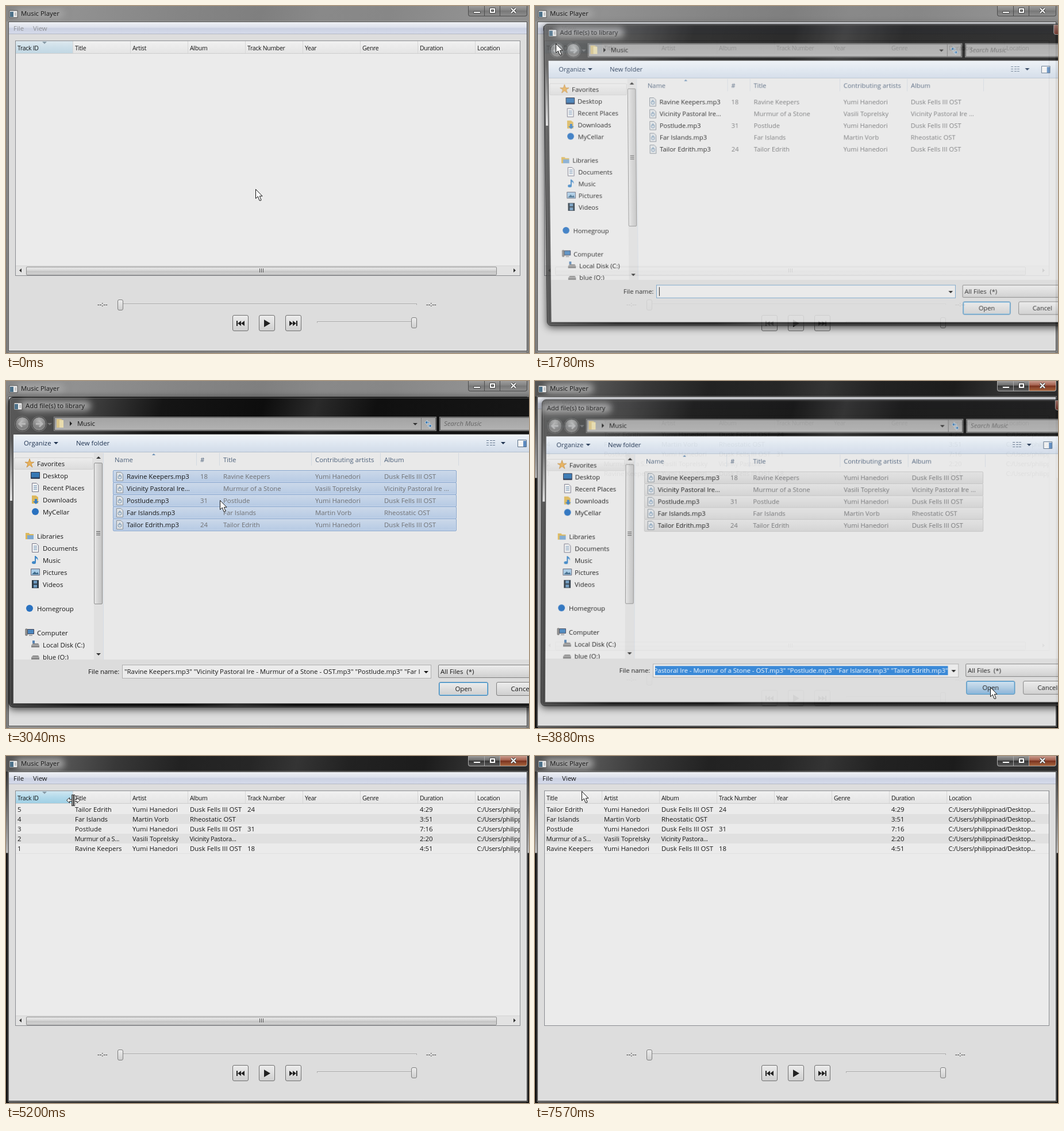
An HTML page that plays this animation: 910 by 603 pixels, repeating every 8000 ms.

```html
<!DOCTYPE html>
<html lang="en">
<head>
<meta charset="utf-8">
<title>Music Player</title>
<style>
html, body { margin: 0; width: 100%; height: 100%; overflow: hidden; }
#stage { position: relative; width: 910px; height: 603px; overflow: hidden; background: #777;
  font: 11.4px/16px "Open Sans", "Noto Sans", sans-serif; color: #161616; }
#stage div, #stage svg { position: absolute; box-sizing: border-box; }
#stage svg { overflow: visible; }
.t { white-space: pre; height: 16px; }
.s { font-size: 10.5px; letter-spacing: -.3px; }
.e { font-size: 11px; letter-spacing: -.3px; }
.dim { color: #6f7072; }
.glow { background: #a2a2a2; border-radius: 9px; filter: blur(6px); }
.glass { background: linear-gradient(100deg, #868686, #919191 120px, #858585 300px, #7f7f7f 440px, #898989 540px, #878787 660px, #919191 800px, #8c8c8c); }
.on .glass { background: linear-gradient(100deg, #555, #5c5c5c 80px, #383838 190px, #222 300px, #262626 420px, #343434 500px, #222 590px, #1c1c1c 720px, #333 810px, #222); }
.side { background: linear-gradient(#8f8f8f, #777); }
.on .side { background: linear-gradient(#2c2c2c, #b5b5b5 141px, #161616 142px, #101010); }
.btn { border: 1px solid #7e7e7e; border-radius: 3px; background: linear-gradient(#ececec, #dedede 50%, #cfcfcf); }
.cap { border: 1px solid #4c4c4c; border-top: 0; background: linear-gradient(#a0a0a0, #828282 50%, #777 50%, #8c8c8c); }
.on .cap { border-color: #aaa; background: linear-gradient(#a2a2a2, #666 50%, #333 50%, #5a5a5a); }
.on .cap.x { background: linear-gradient(#cfa598, #a05a47 50%, #78301e 50%, #a8663f); }
.menu { background: #efefef; border: 1px solid #979797; box-shadow: 2px 2px 3px #0006; }
.hot { border: 1px solid #aecff0; border-radius: 3px; background: linear-gradient(#e8eff8, #d5e4f4); }
.row { border: 1px solid transparent; border-radius: 2px; }
.row.sel { border-color: #84a4cd; background: linear-gradient(#cbd8e9, #b6cae4); box-shadow: inset 0 0 0 1px #d5e0ee99; }
.row.off { border-color: #c4c4c4; background: linear-gradient(#e2e2e2, #d3d3d3); }
</style>
</head>
<body>
<div id="stage"></div>
<script>
const stage = document.getElementById('stage');

function box(p, x, y, w, h, css = '', cls = '') {
  const d = document.createElement('div');
  d.className = cls;
  d.style.cssText = `left:${x}px;top:${y}px;width:${w}px;height:${h}px;${css}`;
  p.append(d);
  return d;
}
function txt(p, x, y, s, cls = '', css = '') {
  const d = document.createElement('div');
  d.className = 't ' + cls;
  d.style.cssText = `left:${x}px;top:${y - 8}px;${css}`;
  d.textContent = s;
  p.append(d);
  return d;
}
function art(p, x, y, inner) {
  const d = box(p, x, y, 0, 0);
  d.innerHTML = `<svg width="16" height="16">${inner}</svg>`;
  return d;
}
const tri = (p, x, y, w, h, c = '#333') =>
  art(p, x, y, `<path d="M${-w} 0H${w}L0 ${h}Z" fill="${c}"/>`);
const show = (d, on) => { d.style.display = on ? '' : 'none'; };
const appIcon = '<path d="M0 0H14V12H0Z" fill="#eee" stroke="#555"/><path d="M1 2H7V11H1Z" fill="#4d7189"/><path d="M9 4H12M9 6H12M9 8H12" stroke="#999"/>';

// Main window
const main = box(stage, 0, 0, 910, 603);
box(main, 0, 0, 910, 603, '', 'glass');
box(main, 0, 27, 5, 576, '', 'side');
box(main, 905, 27, 5, 576, '', 'side');
box(main, 16, 4, 86, 18, '', 'glow');
art(main, 5.5, 7.5, appIcon);
txt(main, 26, 13, 'Music Player');
box(main, 804, -1, 29, 19, 'border-radius:0 0 0 4px', 'cap');
box(main, 832, -1, 28, 19, '', 'cap');
box(main, 859, -1, 48, 19, 'border-radius:0 0 4px', 'cap x');
art(main, 0, 0, `<g fill="#fff" stroke="#444"><path d="M813.5 9.5H825.5V12.5H813.5Z"/>
<path d="M841.5 3.5H851.5V12.5H841.5ZM844.5 6.5V9.5H848.5V6.5Z" fill-rule="evenodd"/></g>
<path d="M879 4L887 12M887 4L879 12" stroke="#444" stroke-width="4"/><path d="M879 4L887 12M887 4L879 12" stroke="#fff" stroke-width="2"/>`);
box(main, 4, 27, 903, 573, 'background:#ddd;border:1px solid #4a4a4a;box-shadow:0 0 0 1px #aaa8');
box(main, 5, 28, 901, 21, 'background:linear-gradient(#eef0f4,#dde1ec 45%,#cbd1e2 55%,#d5daea);border-bottom:1px solid #b4b8c4');
const fileHot = box(main, 6, 29, 33, 19, 'border:1px solid #98a0b0;border-radius:3px;background:#ccd3e4');
const viewHot = box(main, 40, 29, 39, 19, 'border:1px solid #98a0b0;border-radius:3px;background:#d3d9e8');
const heads = [txt(main, 13, 39, 'File'), txt(main, 47, 39, 'View')];

// Track table
const table = box(main, 16, 60, 879, 409, 'background:#ebebeb;border:1px solid #8a8c90;overflow:hidden');
box(table, 0, 0, 877, 22, 'background:linear-gradient(#f1f1f1,#ebebeb 50%,#e4e4e4);border-bottom:1px solid #cfcfcf');
const rowBg = box(table, 0, 23, 877, 86, 'background:repeating-linear-gradient(#ebebeb 0 17px,#e0e0e0 17px 34px)');
const path = 'C:/Users/philippinad/Desktop/Music';
const dusk = 'Dusk Fells III OST', yumi = 'Yumi Hanedori';
const data = [
  ['Track ID', '5', '4', '3', '2', '1'],
  ['Title', 'Tailor Edrith', 'Far Islands', 'Postlude', 'Murmur of a S...', 'Ravine Keepers'],
  ['Artist', yumi, 'Martin Vorb', yumi, 'Vasili Toprelsky', yumi],
  ['Album', dusk, 'Rheostatic OST', dusk, 'Vicinity Pastora...', dusk],
  ['Track Number', '24', '', '31', '', '18'],
  ['Year'], ['Genre'],
  ['Duration', '4:29', '3:51', '7:16', '2:20', '4:51'],
  ['Location', path, path, path, path, path]
];
const cells = [], places = [];
const cols = data.map((list, i) => {
  const c = box(table, 0, 0, 100, 120, 'overflow:hidden');
  const bg = box(c, 0, 0, 100, 21, 'width:100%;border-right:1px solid #d6d6d6');
  list.forEach((s, r) => {
    const small = !r || i === 8 || s.endsWith('...');
    const d = txt(c, small && r ? 2.5 : 3, r ? 15 + 17 * r : 12, s, r ? (small ? 'e' : '') : 's');
    if (r) cells.push(d);
    if (r && i === 8) places.push(d);
  });
  return { c, bg };
});
const sort = tri(table, 50, 1, 4, 4, '#8699a5');

const bar = box(table, 0, 390, 877, 17, 'background:#e2e2e2;border-top:1px solid #d4d4d4');
const thumb = box(bar, 18, 1, 819, 15, 'border:1px solid #8d8d8d;border-radius:2px;background:linear-gradient(#e6e6e6,#d6d6d6 50%,#c6c6c6 50%,#cfcfcf)');
const grip = art(bar, 428, 4, '<path d="M.5 0V7M3.5 0V7M6.5 0V7" stroke="#555"/>');
art(bar, 0, 0, '<path d="M10 4V11L6 7.5ZM866 4V11L870 7.5Z" fill="#333"/>');

// Player controls
txt(main, 159, 518, '--:--');
txt(main, 731, 518, '--:--');
const groove = 'background:#e8e8e8;border:1px solid #a8a8a8;border-bottom-color:#ddd';
box(main, 194, 517, 521, 3, groove);
box(main, 541, 548, 174, 3, groove);
box(main, 194, 510, 10, 19, '', 'btn');
box(main, 705, 541, 10, 19, '', 'btn');
['M7 9V18H9V9ZM15 9V18L9 13.5ZM21 9V18L15 13.5Z', 'M9 7V20L20 13.5Z', 'M7 9V18L13 13.5ZM13 9V18L19 13.5ZM19 9V18H21V9Z']
  .forEach((d, i) => {
    const b = box(main, 394 + 46 * i, 537, 28, 28, 'border-color:#6f6f6f', 'btn');
    art(b, -1, 0, `<path d="${d}" fill="#222"/>`);
  });

function menu(x, w, h, items, step) {
  const m = box(main, x, 49, w, h, '', 'menu');
  box(m, 27, 1, 1, h - 4, 'background:#d8d8d8');
  const hot = box(m, 2, 1, w - 6, step, '', 'hot');
  items.forEach((s, i) => {
    txt(m, 32, 1 + step * (i + .5), s);
    if (items.length > 1) art(m, 8, 4 + step * i, '<path d="M3 7L6 10L11 3" fill="none" stroke="#222" stroke-width="2"/>');
  });
  return { m, hot };
}
const fileMenu = menu(5, 165, 26, ['Add file(s) to library'], 22);
const viewMenu = menu(40, 140, 184, data.map(d => d[0]), 20);

// File dialog, laid out in stage coordinates
const dlg = box(stage, 5, 28, 964, 539, 'border-radius:7px;background:linear-gradient(105deg,#5a5a5a,#3c3c3c 150px,#151515 260px,#0d0d0d 430px,#2a2a2a 520px,#101010 620px,#1a1a1a);border:1px solid #050505;box-shadow:inset 0 0 0 1px #8888,0 3px 14px #000c');
const D = box(dlg, -6, -29, 964, 600);
box(D, 7, 100, 4, 108, 'background:linear-gradient(#fff0,#e2e2e2)');
const dlgGlow = box(D, 24, 34, 124, 18, '', 'glow');
const dlgIcon = art(D, 13.5, 37.5, appIcon);
const dlgTitle = txt(D, 34, 43, 'Add file(s) to library');
box(D, 911, 29, 46, 18, 'border:1px solid #999;border-radius:0 0 4px 4px;background:linear-gradient(#96685f,#6b2c20)');
for (const x of [16, 45]) {
  const b = box(D, x, 62, 25, 25, 'border-radius:50%;border:1px solid #444;background:radial-gradient(circle at 50% 25%,#b4b4b4,#808080 60%,#989898);box-shadow:0 0 0 1px #777');
  art(b, 0, 0, `<path d="M6 11.5H17M${x < 20 ? '11 6.5L6 11.5L11 16.5' : '12 6.5L17 11.5L12 16.5'}" fill="none" stroke="#b8b8b8" stroke-width="3"/>`);
}
tri(D, 76, 73, 4, 4, '#777');
const field = 'border:1px solid #555;background:linear-gradient(#a3a3a3,#b2b2b2);box-shadow:0 0 0 1px #888';
box(D, 84, 63, 664, 23, field);
box(D, 722, 64, 1, 21, 'background:#777');
art(D, 88, 66, '<path d="M0 0H8L12 4V15H0Z" fill="#d9c48a"/><path d="M5 2H12V15H5Z" fill="#e9dcae"/>');
art(D, 111, 70, '<path d="M0 0V8L4 4Z" fill="#222"/>');
txt(D, 124, 74, 'Music');
tri(D, 712, 73, 4, 4);
art(D, 728, 67, '<path d="M5 1L1 5L5 9V6H9V4H5ZM9 7L13 11L9 15V12H6V10H9Z" fill="#3a78b0" stroke="#dde6ee" stroke-width=".8"/>');
box(D, 755, 63, 205, 23, field);
txt(D, 762, 74, 'Search Music', '', 'font-style:italic;color:#666');

box(D, 12, 92, 950, 469, 'background:#e9e9e9;border:1px solid #555');
box(D, 13, 93, 948, 31, 'background:linear-gradient(#eff3f8,#dfe7f1 50%,#d2dce9);border-bottom:1px solid #b3bfce');
txt(D, 31, 108, 'Organize', '', 'color:#1e3250');
tri(D, 87, 106, 4, 4, '#1e3250');
txt(D, 122, 108, 'New folder', '', 'color:#1e3250');
art(D, 836, 102, '<path d="M0 1.5H4M0 5.5H4M0 9.5H4M6 1.5H15M6 5.5H15M6 9.5H15" stroke="#66788f" stroke-dasharray="4 1"/>');
tri(D, 865, 106, 4, 4, '#1e3250');
art(D, 890, 102, '<path d="M.5 .5H15.5V12.5H.5Z" fill="#f4f4f4" stroke="#5a7088"/><path d="M10 2H15V12H10Z" fill="#5c8ac0"/>');

// Navigation pane
const nav = box(D, 13, 125, 157, 359, 'overflow:hidden;border-right:1px solid #d5dce4');
box(nav, 1, 8, 138, 21, 'border:1px solid #d2d2d2;border-radius:2px;background:linear-gradient(#ececec,#dcdcdc)');
const disk = '<path d="M1 9L4 6H13L15 9V13H1Z" fill="#888"/><path d="M1 9H15" stroke="#ccc"/>';
const icons = {
  star: '<path d="M8 0L10 6H16L11 9L13 15L8 11L3 15L5 9L0 6H6Z" fill="#e8b25c" stroke="#b87820" stroke-width=".6"/>',
  screen: '<path d="M.5 2.5H15.5V13.5H.5Z" fill="#3677b4" stroke="#334"/><path d="M1 12H15" stroke="#223"/>',
  page: '<path d="M2.5 .5H10L13.5 4V15.5H2.5Z" fill="#f2f2f2" stroke="#778"/><path d="M5 5H11M5 8H11M5 11H11" stroke="#5b83ab"/>',
  folder: '<path d="M1 3H7L8 5H15V14H1Z" fill="#dcb85c"/><path d="M4 7H15V14H4Z" fill="#7fa9d0"/>',
  down: '<path d="M2 1H9L13 4V15H2Z" fill="#dcb85c"/><path d="M7 7H11V11H14L9 16L4 11H7Z" fill="#3b7fc4"/>',
  dot: '<circle cx="8" cy="8" r="6" fill="#2a72c0"/>',
  note: '<path d="M8 1V12" stroke="#3d86c6" stroke-width="2"/><path d="M8 1Q14 4 12 9Q12 5 8 5" fill="#3d86c6"/><ellipse cx="5.500" cy="12.500" rx="3.500" ry="2.500" fill="#3d86c6"/>',
  pic: '<path d="M.5 2.5H15.5V13.5H.5Z" fill="#a8cbe6" stroke="#667"/><path d="M2 12L7 7L10 10L12 8L14 12Z" fill="#3f6a8a"/>',
  film: '<path d="M2 1H14V15H2Z" fill="#2f3c48"/><path d="M5 2H11V7H5ZM5 9H11V14H5Z" fill="#6d9ac0"/>',
  pc: '<path d="M4.500 2.500H15.500V10.500H4.500Z" fill="#4b87bf" stroke="#445"/><path d="M1 2H4V13H1ZM7 13H13" fill="#999" stroke="#666"/>',
  disk: disk + '<path d="M3 1H7V6H3Z" fill="#5a86b4"/>', flat: disk
};
[['star', 'Favorites', 0, 1], ['screen', 'Desktop', 1], ['page', 'Recent Places', 2], ['down', 'Downloads', 3], ['dot', 'MyCellar', 4],
  ['folder', 'Libraries', 6, 1], ['page', 'Documents', 7], ['note', 'Music', 8], ['pic', 'Pictures', 9], ['film', 'Videos', 10],
  ['dot', 'Homegroup', 12, 1], ['pc', 'Computer', 14, 1], ['disk', 'Local Disk (C:)', 15], ['flat', 'blue (O:)', 16]
].forEach(([icon, name, n, top]) => {
  const x = top ? 20 : 30, y = 19 + 21 * n;
  art(nav, x, y - 9, icons[icon]);
  txt(nav, x + 21, y, name);
});
box(nav, 140, 0, 16, 359, 'background:#e0e0e0');
box(nav, 140, 17, 15, 246, 'border:1px solid #909090;border-radius:2px;background:linear-gradient(90deg,#e6e6e6,#d2d2d2 50%,#c4c4c4)');
art(nav, 144, 136, '<path d="M0 .5H7M0 3.500H7M0 6.500H7" stroke="#555"/>');
art(nav, 148, 6, '<path d="M-4 4H4L0 0Z" fill="#333"/>');
tri(nav, 148, 348, 4, 4);

// File list
const listX = [189, 338, 378, 538, 658];
['Name', '#', 'Title', 'Contributing artists', 'Album'].forEach((s, i) => txt(D, listX[i], 137, s, '', 'color:#4c607a'));
[331, 371, 531, 651, 787].forEach(x => box(D, x, 125, 1, 22, 'background:#d3d9e0'));
art(D, 257, 125, '<path d="M-3 4L0 1L3 4" fill="#6a8fb5"/>');
const vic = 'Vicinity Pastoral Ire';
const files = [
  ['Ravine Keepers.mp3', '18', 'Ravine Keepers', yumi, dusk],
  [vic + '...', '', 'Murmur of a Stone', 'Vasili Toprelsky', vic + ' ...'],
  ['Postlude.mp3', '31', 'Postlude', yumi, dusk],
  ['Far Islands.mp3', '', 'Far Islands', 'Martin Vorb', 'Rheostatic OST'],
  ['Tailor Edrith.mp3', '24', 'Tailor Edrith', yumi, dusk]
];
const rows = files.map((f, r) => {
  const y = 166 + 21 * r, d = box(D, 186, y - 11, 598, 22, '', 'row');
  art(D, 191, y - 8, '<path d="M1.500 .5H9L12.500 4V15.500H1.500Z" fill="#dfe2e5" stroke="#8a929a"/><circle cx="7" cy="9" r="3" fill="none" stroke="#6d8fae"/><path d="M7 9V4" stroke="#6d8fae"/>');
  f.forEach((s, i) => txt(D, i ? listX[i] : 210, y, s, i ? 'dim' : ''));
  return d;
});

// Bottom panel
box(D, 13, 484, 948, 76, 'background:#dcdcdc');
txt(D, 143, 505, 'File name:');
const input = box(D, 202, 493, 538, 24, 'background:#ebebeb;border:1px solid #b0b0b0');
const clip = box(input, 3, 3, 515, 16, 'overflow:hidden');
const names = txt(clip, 0, 8, '');
const caret = box(input, 4, 3, 1, 16, 'background:#000');
tri(D, 731, 504, 4, 4, '#111');
box(D, 752, 493, 205, 23, 'border-radius:2px', 'btn');
txt(D, 756, 505, 'All Files  (*)');
const open = box(D, 753, 523, 86, 24, 'border-color:#3c7fb1;box-shadow:inset 0 0 0 1px #7fbfe6', 'btn');
txt(D, 753, 535, 'Open', '', 'width:86px;text-align:center');
box(D, 853, 523, 86, 24, '', 'btn');
txt(D, 853, 535, 'Cancel', '', 'width:86px;text-align:center');
const quoted = ['Ravine Keepers', vic + ' - Murmur of a Stone - OST', 'Postlude', 'Far Islands', 'Tailor Edrith'].map(s => `"${s}.mp3"`);

// Pointer
const arrow = art(stage, 0, 0, '<path d="M.5 .5V16.500L4.300 13L7 20H9.500L10 19L7.300 12.300H12Z" fill="#fff" stroke="#111"/>');
const split = art(stage, 0, 0, '<path d="M-1.500 -9.500H.5V9.500H-1.500ZM1.500 -9.500H3.500V9.500H1.500ZM-10.500 0L-5.500 -4.500V-1.500H-1.500V1.500H-5.500V4.500ZM12.500 0L7.500 -4.500V-1.500H3.500V1.500H7.500V4.500Z" fill="#fff" stroke="#222"/>');

const mouse = [[20, 434, 318], [430, 24, 56], [630, 24, 56], [770, 22, 38], [980, 22, 38], [1150, 36, 65], [2200, 36, 65],
  [2620, 372, 207], [3110, 372, 207], [3640, 792, 532], [4000, 792, 532], [4720, 108, 78], [4860, 108, 78], [5130, 116, 77],
  [5340, 116, 77], [5640, 55, 77], [5750, 55, 77], [6080, 60, 38], [6320, 60, 38], [6600, 81, 61]];
// time, opacity, scale, tilt, vertical shift
const zoom = [[1690, 0, .93, 6e-5, -6], [1780, .86, .973, 2.4e-5, -2.3], [1990, 1, 1, 0, 0], [3810, 1, 1, 0, 0],
  [3880, .95, .988, -7.8e-6, .4], [4090, 0, .92, -5e-5, 3]];

function track(keys, t, ease = u => u) {
  const i = keys.findIndex(k => k[0] > t);
  if (i === 0) return keys[0].slice(1);
  if (i < 0) return keys[keys.length - 1].slice(1);
  const a = keys[i - 1], b = keys[i], u = ease((t - a[0]) / (b[0] - a[0]));
  return a.slice(1).map((v, n) => v + (b[n + 1] - v) * u);
}
const smooth = u => u * u * (3 - 2 * u);
const within = (t, a, b) => t >= a && t < b;
const fade = (t, a, b) => Math.max(0, Math.min(1, (t - a) / 120, (b - t) / 100));

function drawTable(t, mx) {
  const hidden = t >= 7430;
  const first = hidden ? 0 : t < 5340 ? 100 : t < 5640 ? Math.max(39, mx - 16) : 39;
  const hover = within(t, 4650, 5700);
  let x = 0;
  cols.forEach(({ c, bg }, i) => {
    const w = i ? (i === 8 ? Math.max(100, 877 - x) : 100) : first;
    c.style.left = x + 'px';
    c.style.width = w + 'px';
    if (!i) bg.style.background = hover ? 'linear-gradient(#cfe6f1,#b3daeb 50%,#9fcfe4)' : 'linear-gradient(#dde8ee,#cddfe9 50%,#c1d7e3)';
    if (i === 8) {
      const n = Math.max(16, Math.floor((w - 17) / 5.7));
      places.forEach(d => { d.textContent = path.slice(0, n) + '...'; });
    }
    x += w;
  });
  show(sort, !hidden);
  sort.style.left = first / 2 + 'px';
  const total = 800 + first;
  const tw = Math.min(841, 819 + (100 - first));
  show(bar, total > 877);
  thumb.style.width = tw + 'px';
  grip.style.left = 14 + tw / 2 + 'px';
  const filled = t >= 3840;
  show(rowBg, filled);
  cells.forEach(d => show(d, filled));
}

function drawDialog(t) {
  const [op, s, g, dy] = track(zoom, t);
  show(dlg, op > 0);
  dlg.style.opacity = op;
  dlg.style.transform = s === 1 ? 'none' : `matrix3d(${s},0,0,0,0,${s},0,${g},0,0,1,0,0,${dy},0,1)`;
  const all = t >= 2900, one = t >= 2690, left = t >= 3740;
  rows.forEach((d, i) => { d.className = 'row' + (all || one && i === 2 ? (left ? ' off' : ' sel') : ''); });
  names.textContent = all ? quoted.join(' ') : one ? 'Postlude.mp3' : '';
  names.style.left = left ? 'auto' : '0';
  names.style.right = left ? '0' : 'auto';
  names.style.background = left ? '#2f83d6' : 'none';
  names.style.color = left ? '#fff' : '';
  show(caret, !one);
  input.style.borderColor = one ? '#b0b0b0' : '#6f9fc8';
  open.style.background = t >= 3580 ? 'linear-gradient(#cfe1ef,#aecbe3 50%,#86b0d6)' : '';
  show(dlgIcon, t < 3840);
  const titleX = t < 3840 ? 34 : 14;
  dlgTitle.style.left = titleX + 'px';
  dlgGlow.style.left = titleX - 10 + 'px';
}

function draw(t) {
  const [mx, my] = track(mouse, t, smooth);
  const active = within(t, 700, 1640) || t >= 3840;
  main.className = active ? 'on' : '';
  heads.forEach(d => { d.style.color = active ? '#161616' : '#8f9094'; });
  show(fileHot, within(t, 770, 1430));
  show(viewHot, within(t, 6040, 7430));
  fileMenu.m.style.opacity = fade(t, 840, 1560);
  viewMenu.m.style.opacity = fade(t, 6250, 7500);
  show(fileMenu.hot, my > 51);
  show(viewMenu.hot, my > 51);
  drawTable(t, mx);
  drawDialog(t);
  const sizing = within(t, 5000, 5780);
  show(arrow, !sizing);
  show(split, sizing);
  const p = sizing ? split : arrow;
  p.style.left = mx + 'px';
  p.style.top = my + 'px';
}

const start = performance.now();
function loop() {
  draw((performance.now() - start) % 8000);
  requestAnimationFrame(loop);
}
draw(0);
requestAnimationFrame(loop);
</script>
</body>
</html>
```
